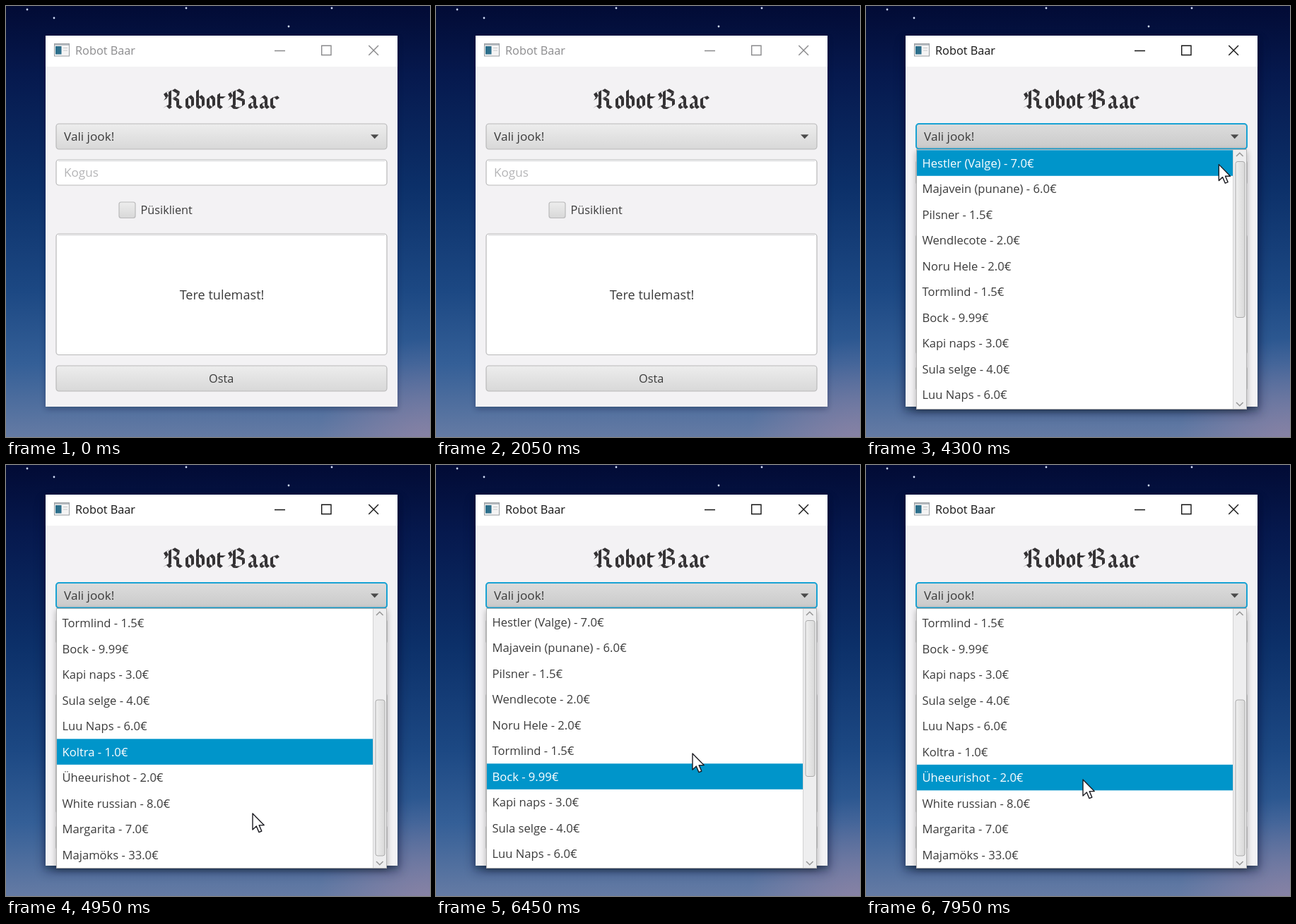
Animation of 600x611 px, one loop 8000 ms. Source, as an HTML page:

```html
<!DOCTYPE html>
<html lang="et">
<head>
<meta charset="utf-8">
<title>Robot Baar</title>
<style>
html, body { margin: 0; width: 100%; height: 100%; overflow: hidden; background: #071b4d; }
svg { display: block; width: 600px; height: 611px; }
text { font: 16.6px "Open Sans", "Noto Sans", sans-serif; fill: #3b3b3b; white-space: pre; }
.small { font-size: 16.3px; }
.combo { font-size: 17.2px; }
.hint { font-size: 17.1px; fill: #b4b4b6; }
.message { font-size: 18.1px; text-anchor: middle; }
.box { stroke: #b9b9ba; stroke-width: 1.2; }
#caption { fill: #8c8c8e; }
#controls { fill: none; stroke: #8a8a8c; stroke-width: 1.4; }
.active #caption { fill: #161616; }
.active #controls { stroke: #161616; }
.whenActive { visibility: hidden; }
.active .whenActive { visibility: visible; }
.row rect { fill: none; }
.row.hover rect { fill: #0095ca; }
.row.hover text { fill: #fff; }
</style>
</head>
<body>
<svg id="stage" viewBox="0 0 600 611">
  <defs>
    <linearGradient id="sky" x2="0" y2="1">
      <stop offset="0" stop-color="#020b35"/>
      <stop offset=".16" stop-color="#06194e"/>
      <stop offset=".42" stop-color="#0c3069"/>
      <stop offset=".66" stop-color="#1c4883"/>
      <stop offset=".83" stop-color="#345f97"/>
      <stop offset="1" stop-color="#657ba4"/>
    </linearGradient>
    <radialGradient id="dusk" cx="1" cy="1.04" r=".27">
      <stop offset="0" stop-color="#9a86a5" stop-opacity=".75"/>
      <stop offset="1" stop-color="#9a86a5" stop-opacity="0"/>
    </radialGradient>
    <linearGradient id="button" x2="0" y2="1">
      <stop offset="0" stop-color="#ededed"/>
      <stop offset="1" stop-color="#d8d8d8"/>
    </linearGradient>
    <linearGradient id="pressed" x2="0" y2="1">
      <stop offset="0" stop-color="#dcdcdc"/>
      <stop offset="1" stop-color="#cacaca"/>
    </linearGradient>
    <linearGradient id="thumbFill">
      <stop offset="0" stop-color="#efefef"/>
      <stop offset="1" stop-color="#d9d9d9"/>
    </linearGradient>
    <filter id="soft" x="-20%" y="-20%" width="140%" height="140%"><feGaussianBlur stdDeviation="8"/></filter>
    <filter id="near" x="-20%" y="-20%" width="140%" height="140%"><feGaussianBlur stdDeviation="4"/></filter>
    <clipPath id="listClip"><rect x="72" y="204" width="466" height="367"/></clipPath>
  </defs>

  <rect width="600" height="611" fill="url(#sky)"/>
  <rect width="600" height="611" fill="url(#dusk)"/>
  <g id="stars" fill="#cfdcf5"></g>

  <rect x="56" y="45" width="498" height="526" fill="#000a25" opacity=".32" filter="url(#near)"/>
  <rect class="whenActive" x="55" y="50" width="501" height="526" fill="#000a25" opacity=".42" filter="url(#soft)"/>
  <rect x="56" y="42" width="498" height="526" fill="#f3f2f4"/>
  <rect x="56" y="42" width="498" height="44" fill="#fff"/>

  <rect x="68.5" y="53.5" width="21" height="17.5" fill="#f4f4f4" stroke="#999da1"/>
  <path d="M69 55H89" stroke="#b8bdc2" stroke-width="2"/>
  <rect x="70" y="57" width="8.5" height="11.5" fill="#2d6f8b"/>
  <path d="M81 59.5H87M81 63H87" stroke="#c5c8cb"/>
  <text id="caption" class="small" x="98" y="69.3">Robot Baar</text>
  <path id="controls" d="M380 63.5H395M446.7 56.2H460V69.5H446.7ZM513.3 56L527 69.7M527 56L513.3 69.7"/>

  <g id="lettering" role="img" aria-label="RobotBaar" fill="#343234"></g>

  <rect x="71" y="167" width="468" height="36" rx="4" fill="url(#button)" class="box"/>
  <rect class="whenActive" x="71" y="167" width="468" height="35.5" rx="4" fill="url(#pressed)" stroke="#18a2d3" stroke-width="2"/>
  <text class="combo" x="82" y="191">Vali jook!</text>
  <path d="M516 182.3H527.4L521.7 188.2Z" fill="#4a4a4a"/>

  <rect x="71" y="218" width="468" height="36" rx="4" fill="#fff" class="box"/>
  <path d="M74 219.6H536" stroke="#e5e5e7" stroke-width="2"/>
  <text class="hint" x="82" y="242">Kogus</text>

  <rect x="160" y="278" width="23" height="22.5" rx="3" fill="url(#button)" class="box"/>
  <text class="small" x="190.5" y="295">Püsiklient</text>

  <rect x="71" y="323" width="468" height="171.5" rx="4" fill="#fff" class="box"/>
  <path d="M74 324.6H536" stroke="#e2e2e4" stroke-width="2"/>
  <text id="message" class="message" x="305.5" y="415.7"></text>

  <rect x="71" y="510" width="468" height="36" rx="4" fill="url(#button)" class="box"/>
  <text class="small" x="287" y="534">Osta</text>

  <g class="whenActive">
    <rect x="71" y="206" width="468" height="368" fill="#000" opacity=".3" filter="url(#near)"/>
    <rect x="71.5" y="203.5" width="467" height="368" fill="#fff" stroke="#b4b4b4"/>
    <g clip-path="url(#listClip)"><g id="rows"></g></g>
    <rect x="519" y="204" width="19" height="367" fill="#eeeeef"/>
    <path d="M519.5 204V571" stroke="#d2d2d3"/>
    <path d="M524 213L528.8 208.2L533.6 213M524 562L528.8 566.8L533.6 562" fill="none" stroke="#969696" stroke-width="1.5"/>
    <rect id="thumb" x="523" y="220.5" width="13" height="221" rx="3" fill="url(#thumbFill)" stroke="#ababab"/>
  </g>

  <path id="cursor" d="M0 0V23L5.3 18L9 26.6L12.8 25L9.2 16.6H16.2Z" fill="#fff" stroke="#1c1c22" stroke-width="1.4" stroke-linejoin="round"/>
</svg>
<script>
const LOOP = 8000, OPEN = 3950, GREET_END = 3250;
const ROW = 36.5, LIST_TOP = 204, MAX_SCROLL = 181, THUMB_TRAVEL = 112.5;
const $ = id => document.getElementById(id);

function add(parent, tag, attrs, text = '') {
  const el = document.createElementNS('http://www.w3.org/2000/svg', tag);
  for (const key in attrs) el.setAttribute(key, attrs[key]);
  el.textContent = text;
  parent.append(el);
  return el;
}

for (const [cx, cy] of [[30, 5], [68, 17], [255, 3], [400, 29], [461, 3]])
  add($('stars'), 'circle', { cx, cy, r: 1.4 });

// Blackletter: polylines swept by a slanted nib, with strokes shared between letters.
const left = '1 -14 1 -3 5 0', right = '2 -14 5 -17 9 -13 9 -3 5 0';
const capital = ['9 -24 9 -3', '7 -24 2 -21 5 -16 2 -12', '1 -1 6 -4 10 0', '9 -23 14 -26 21 -22 20 -17 13 -14'];
const glyphs = {
  R: { width: 32, strokes: [...capital, '15 -14 20 -11 20 -3 25 0 28 -2'] },
  B: { width: 29, strokes: [...capital, '13 -14 22 -11 22 -4 15 0 10 0'] },
  o: { width: 15, strokes: [left, right] },
  b: { width: 15, strokes: ['1 -25 1 -14', left, right] },
  t: { width: 14, strokes: ['1 -20 1 -14', left, '0 -15 9 -15'] },
  a: { width: 16, strokes: [right, '9 -9 2 -6 2 -2 5 0', '9 -3 12 0'] },
  r: { width: 14, strokes: [left, '2 -14 7 -16 10 -13'] }
};

function sweep(stroke, nibX = 4, nibY = -2.7) {
  const n = stroke.split(' ').map(Number);
  let d = '';
  for (let i = 0; i + 3 < n.length; i += 2) {
    const [x, y, u, v] = n.slice(i, i + 4);
    d += `M${x} ${y}l${nibX} ${nibY}L${u + nibX} ${v + nibY}L${u} ${v}Z`;
  }
  return d;
}

let pen = 221;
for (const letter of 'RobotBaar') {
  const { width, strokes } = glyphs[letter];
  for (const stroke of strokes)
    for (const d of sweep(stroke).match(/M[^Z]+Z/g))
      add($('lettering'), 'path', { d, transform: `translate(${pen} 146)` });
  pen += width;
}

const rows = ['Hestler (Valge) - 7.0€', 'Majavein (punane) - 6.0€', 'Pilsner - 1.5€',
  'Wendlecote - 2.0€', 'Noru Hele - 2.0€', 'Tormlind - 1.5€', 'Bock - 9.99€', 'Kapi naps - 3.0€',
  'Sula selge - 4.0€', 'Luu Naps - 6.0€', 'Koltra - 1.0€', 'Üheeurishot - 2.0€',
  'White russian - 8.0€', 'Margarita - 7.0€', 'Majamöks - 33.0€'].map((name, i) => {
  const row = add($('rows'), 'g', { class: 'row', transform: `translate(0 ${LIST_TOP + i * ROW})` });
  add(row, 'rect', { x: 72, y: .3, width: 447, height: ROW });
  add(row, 'text', { x: 79.5, y: 24.5 }, name);
  return row;
});

const clamp = x => Math.min(1, Math.max(0, x));
const ease = u => u < .5 ? 2 * u * u : 1 - 2 * (1 - u) ** 2;

const stops = [[3000, 620, 330], [3500, 527, 175], [4050, 527, 175], [4950, 349, 494],
  [6450, 363, 409], [7100, 362, 449], [7950, 307, 446]];
function cursorAt(t) {
  const next = stops.findIndex(([time]) => time > t);
  if (next < 1) return stops.at(next).slice(1);
  const [t0, x0, y0] = stops[next - 1], [t1, x1, y1] = stops[next];
  const k = ease((t - t0) / (t1 - t0));
  return [x0 + (x1 - x0) * k, y0 + (y1 - y0) * k];
}

// A wheel spin runs through the list in four notches.
const spin = (t, start) => Math.floor(clamp((t - start) / 200) * 4) / 4;
const scrollAt = t => MAX_SCROLL * (spin(t, 4400) - spin(t, 5700) + spin(t, 6550));

// The highlight follows the pointer only during these spans and stays put in between.
const tracking = [[4050, 4640], [5150, 5950], [6750, LOOP]];
function hoverAt(t) {
  const span = tracking.findLast(([start]) => start <= t);
  if (!span) return -1;
  const seen = Math.min(t, span[1]);
  return Math.floor((cursorAt(seen)[1] - LIST_TOP + scrollAt(seen)) / ROW);
}

function render(t) {
  const scroll = scrollAt(t), hover = hoverAt(t);
  $('stage').classList.toggle('active', t >= OPEN);
  $('message').textContent = t < GREET_END ? 'Tere tulemast!' : 'Vali jook ja kogus.';
  $('rows').setAttribute('transform', `translate(0 ${-scroll})`);
  $('thumb').setAttribute('transform', `translate(0 ${scroll / MAX_SCROLL * THUMB_TRAVEL})`);
  $('cursor').setAttribute('transform', `translate(${cursorAt(t)})`);
  rows.forEach((row, i) => row.classList.toggle('hover', i === hover));
}

function tick() {
  render(performance.now() % LOOP);
  requestAnimationFrame(tick);
}
tick();
</script>
</body>
</html>
```
